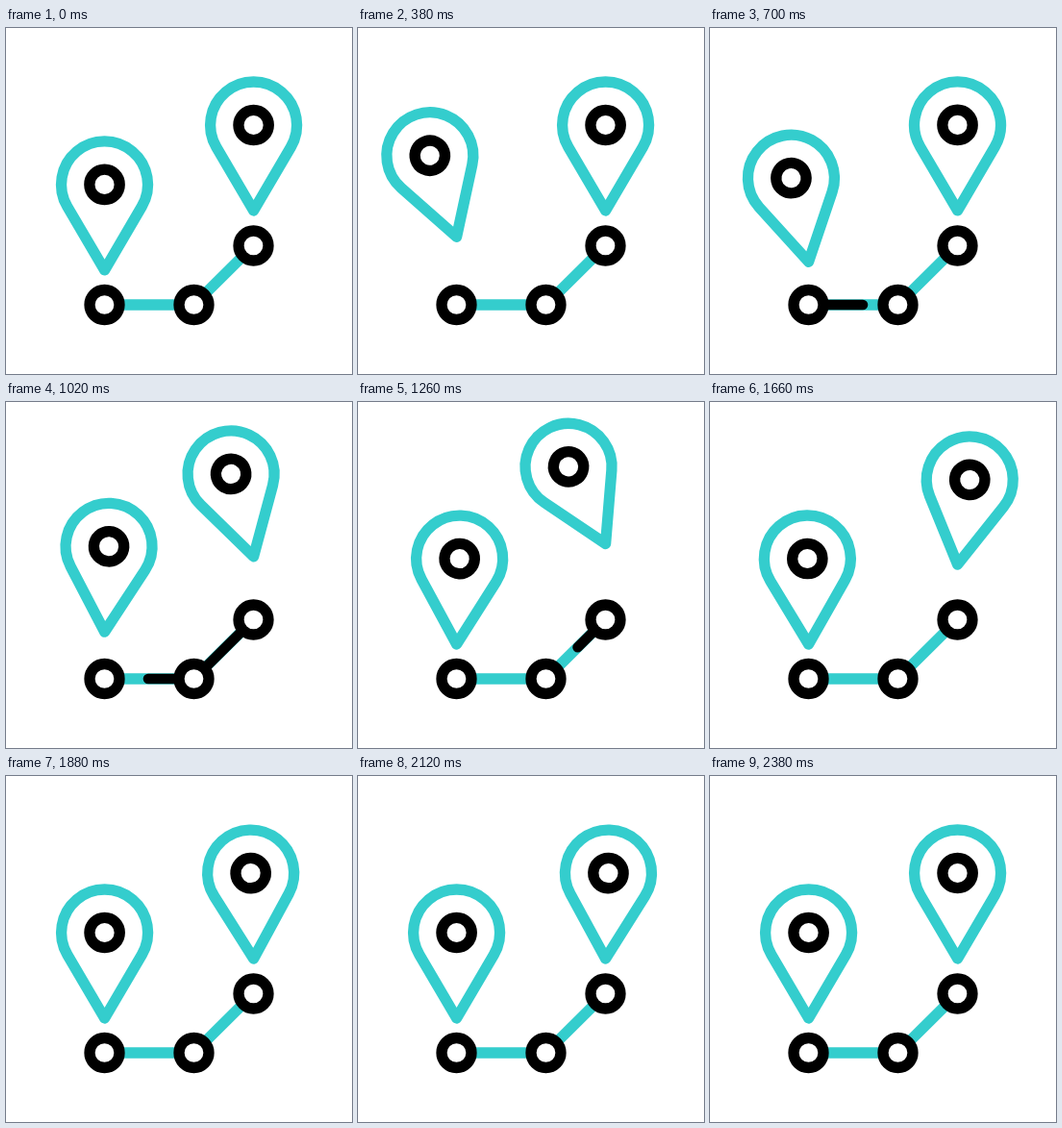
An HTML page that plays this animation: 360x360 px, repeating every 2400 ms.

```html
<!DOCTYPE html>
<html lang="en">
<head>
<meta charset="utf-8">
<title>Route pins</title>
<style>
html, body { margin: 0; width: 100%; height: 100%; overflow: hidden; background: #fff; }
svg { display: block; width: 100vw; height: 100vh; }
.teal, .black { fill: none; stroke-width: 11.3; stroke-linecap: round; stroke-linejoin: round; }
.teal { stroke: #34cdcd; }
.black { stroke: #000; stroke-width: 10.6; }
.node { fill: #fff; stroke: #000; stroke-width: 11.3; }
</style>
</head>
<body>
<svg viewBox="0 0 360 360">
  <defs>
    <g id="pin">
      <path class="teal" d="M0 0L-38.8 -66.2A45 45 0 1 1 38.8 -66.2Z"/>
      <circle class="node" cy="-89" r="15.7"/>
    </g>
  </defs>
  <path class="teal" d="M102.5 288H195.5L257.5 226.5"/>
  <path class="black" id="trail"/>
  <circle class="node" cx="102.5" cy="288" r="15.5"/>
  <circle class="node" cx="195.5" cy="288" r="15.5"/>
  <circle class="node" cx="257.5" cy="226.5" r="15.5"/>
  <use href="#pin" id="left"/>
  <use href="#pin" id="right"/>
</svg>
<script>
const LOOP = 2400;
const byId = id => document.getElementById(id);

// [time, value] steps: a linear pull up, then a decaying swing and bounce
const SWING = [[0, 0], [530, -25.3], [570, -25.7], [758, 0], [850, 12.7], [1050, 0],
  [1115, -7], [1195, 0], [1340, 3], [1480, 0], [1590, -2.5], [1680, 0]];
const LIFT = [[0, 0], [505, 46], [728, 0], [755, 0], [915, 23], [1085, 0],
  [1130, 2.5], [1180, 0]];

const pins = [
  { el: byId('left'), x: 102.6, y: 252, delay: 0 },
  { el: byId('right'), x: 257.6, y: 190, delay: 700 }
];
const route = [[102.5, 288], [195.5, 288], [257.5, 226.5]];
const lengths = [93, Math.hypot(62, 61.5)];
const total = lengths[0] + lengths[1];
const trail = byId('trail');

const progress = (t, from, to) => Math.min(1, Math.max(0, (t - from) / (to - from)));

function sample(steps, t) {
  if (t <= 0) return 0;
  const i = steps.findIndex(s => s[0] > t);
  if (i < 0) return 0;
  const [t0, a] = steps[i - 1], [t1, b] = steps[i];
  const p = progress(t, t0, t1);
  if (i === 1) return b * p;
  // slow near each extreme, fast through rest
  return b ? a + (b - a) * Math.sin(p * Math.PI / 2) : a * Math.cos(p * Math.PI / 2);
}

function pointAt(d) {
  const i = d < lengths[0] ? 0 : 1;
  const p = (d - i * lengths[0]) / lengths[i];
  return route[i].map((v, k) => v + (route[i + 1][k] - v) * p);
}

function drawTrail(t) {
  const head = total * progress(t, 560, 1010);
  const tail = total * progress(t, 905, 1365);
  const points = [pointAt(tail)];
  if (tail < lengths[0] && head > lengths[0]) points.push(route[1]);
  points.push(pointAt(head));
  trail.setAttribute('d', head > tail ? 'M' + points.join('L') : '');
}

function draw(t) {
  for (const { el, x, y, delay } of pins) {
    const lift = sample(LIFT, t - delay), angle = sample(SWING, t - delay);
    el.setAttribute('transform', `translate(${x} ${y - lift}) rotate(${angle})`);
  }
  drawTrail(t);
}

const start = performance.now();
function tick() {
  draw((performance.now() - start) % LOOP);
  requestAnimationFrame(tick);
}
draw(0);
requestAnimationFrame(tick);
</script>
</body>
</html>
```
